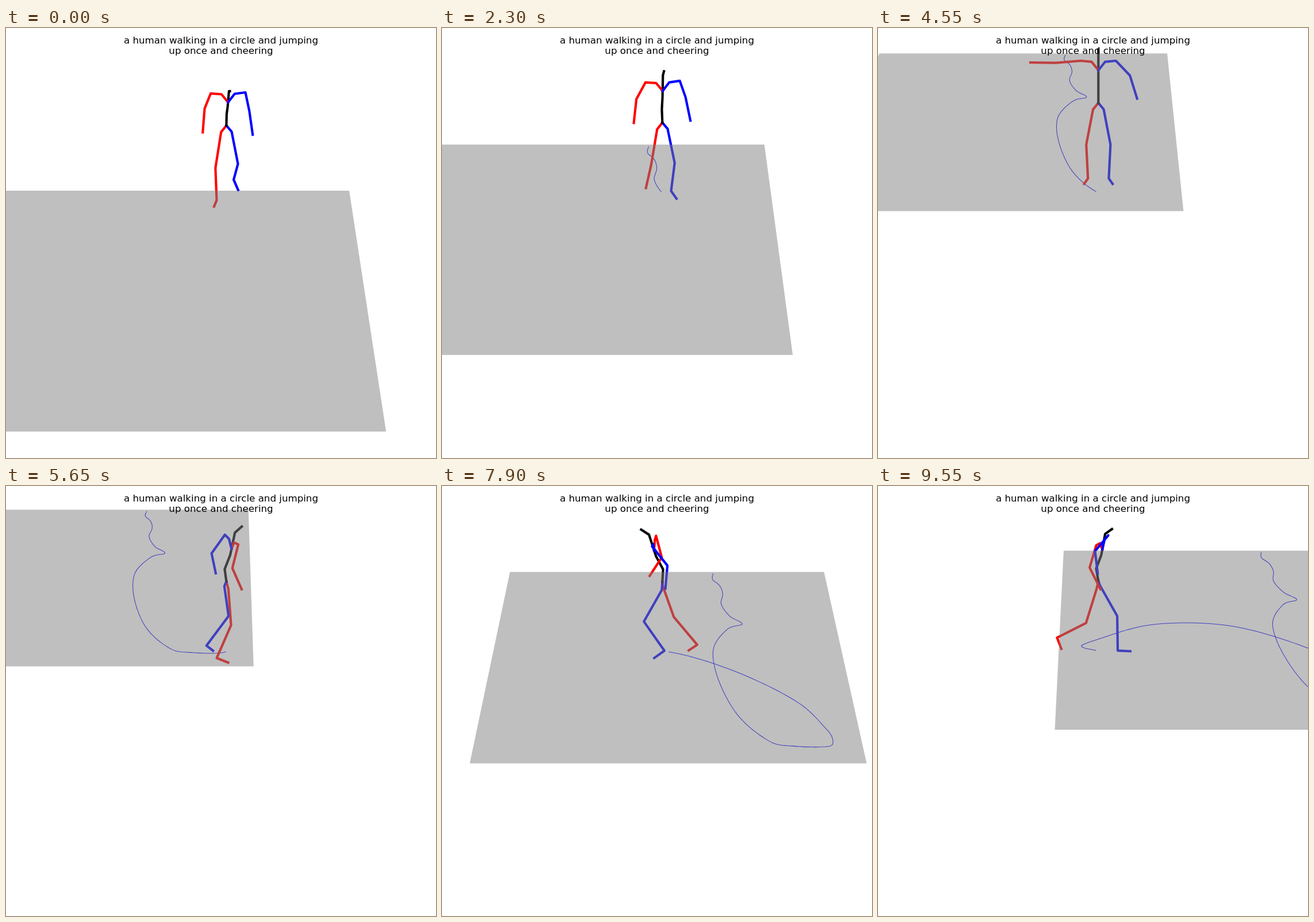
Recreate the animation shown at these times as an HTML page with a canvas. Size 748x748 px, loop 9600 ms.

```html
<!DOCTYPE html>
<html lang="en">
<head>
<meta charset="utf-8">
<title>Walking figure</title>
<style>
html, body { margin: 0; width: 100%; height: 100%; overflow: hidden; background: #fff; }
canvas { display: block; }
</style>
</head>
<body>
<canvas id="stage" width="748" height="748"></canvas>
<script>
const ctx = document.getElementById('stage').getContext('2d');
const LOOP = 9600, STEP = 50;
const RED = '#f00', BLUE = '#00f', BLACK = '#000';

// Camera pitched 30 degrees down, following the figure
const FOCAL = 2583, CENTER_X = 383.35, CENTER_Y = 377.7, RAISE = 90.7;
const COS = Math.cos(Math.PI / 6), SIN = 0.5;
const FLOOR_W = 605.8, FLOOR_D = 690.5, DEPTH_SCALE = 0.75;

// Key points on the floor: time, x, z
const route = [
  [0, 391.5, 8.6], [1000, 390.5, 37], [1300, 402.5, 62], [1550, 407, 97],
  [1850, 402.6, 140], [2300, 417, 191], [2680, 437.7, 222], [3000, 411, 241],
  [3300, 383.4, 314], [3620, 387, 420], [4000, 414, 541], [4550, 461, 625],
  [5000, 497, 640], [5500, 552, 641], [5780, 561, 624], [6000, 556, 594],
  [6700, 510.5, 497], [7400, 403, 387], [7900, 294, 325], [8450, 163.6, 324.5],
  [9000, 54, 391], [9180, 39.4, 408], [9550, 69, 424.7]
];

// Body control: time, heading, gait phase, stride, lean, arm spread
const motion = [
  [0, 0.1, 2.3, 0.25, 0.37, 0.2],
  [1300, 0.15, 6, 0.35, 0.12, 0.3],
  [2200, 0.15, 12, 0.35, -0.1, 0.3],
  [3300, 0.25, 18.65, 0.6, 0.47, 0.5],
  [4550, 0, 25, 0, -0.12, 0.6],
  [5500, 1.7, 28, 0.3, 0.05, 0.3],
  [6700, 3.7, 33.3, 0.45, -0.15, 0.25],
  [7900, 4.6, 41.6, 0.55, 0.12, 0.1],
  [9100, 6.3, 47.3, 0.4, 0.05, 0.1],
  [9550, 7.5, 49.27, 0.4, 0, 0.1]
];

// Spine joints above the pelvis: forward, up
const SPINE = [[-4, 23], [5, 48], [7, 59], [12, 88], [24, 98]];

const { sin, cos, PI, max } = Math;
const clamp = v => max(0, Math.min(1, v));

// Smooth curve through timed rows, one value per column after the time
function sample(keys, t) {
  let i = 0;
  while (i < keys.length - 2 && keys[i + 1][0] <= t) i++;
  const a = keys[i], b = keys[i + 1];
  const before = keys[i - 1] || a, after = keys[i + 2] || b;
  const span = b[0] - a[0], u = clamp((t - a[0]) / span);
  return a.slice(1).map((from, n) => {
    const k = n + 1, d = b[k] - from;
    const va = (b[k] - before[k]) / (b[0] - before[0]) * span;
    const vb = (after[k] - from) / (after[0] - a[0]) * span;
    return from + u * (va + u * (3 * d - 2 * va - vb + u * (va + vb - 2 * d)));
  });
}

function project([x, y, z]) {
  const scale = FOCAL / (FOCAL - SIN * y - COS * z);
  return [CENTER_X + x * scale, CENTER_Y - (RAISE + COS * y - SIN * z) * scale];
}

// Adds bones [length, forward angle, outward angle] one after another
function limb(points, side, bones) {
  for (const [length, angle, splay] of bones) {
    const [x, y, z] = points[points.length - 1];
    points.push([
      x + side * length * sin(splay),
      y - length * cos(splay) * cos(angle),
      z + length * cos(splay) * sin(angle)
    ]);
  }
  return points;
}

// Body chains in the order they are painted; local axes are left, up, forward
function figure(t) {
  const [heading, phase, stride, lean, spread] = sample(motion, t);
  const hop = sin(PI * clamp((t - 4380) / 520));
  const pelvis = [0, 134 - 12 * lean + 42 * hop, 0];
  const spine = [pelvis, ...SPINE.map(([forward, up]) => [
    0,
    pelvis[1] + up * cos(lean) - forward * sin(lean),
    forward * cos(lean) + up * sin(lean)
  ])];
  const chest = spine[3];

  const leg = side => {
    const p = side < 0 ? phase : phase + PI;
    const thigh = 0.1 + stride * sin(p);
    const shin = thigh - 0.4 + 0.3 * hop - 1.6 * stride * max(0, cos(p));
    const hip = [side * 9, pelvis[1] - 12, 0];
    return limb([pelvis, hip], side, [[65, thigh, 0.18], [66, shin, -0.04], [22, shin + 1.5, 0.3]]);
  };
  const arm = side => {
    const p = side < 0 ? phase : phase + PI;
    const swing = -0.45 - 0.6 * stride * sin(p);
    const cheer = side < 0 ? hop : 0;
    const [, y, z] = chest;
    return limb([chest, [side * 11, y + 15, z], [side * 29, y + 17, z]], side,
      [[42, swing, spread + cheer], [42, swing + 0.75, spread * 0.5 + 1.5 * cheer]]);
  };

  const place = ([left, up, forward]) => project([
    left * cos(heading) + forward * sin(heading),
    up,
    DEPTH_SCALE * (forward * cos(heading) - left * sin(heading))
  ]);
  return [[RED, leg(-1)], [BLUE, leg(1)], [BLACK, spine], [RED, arm(-1)], [BLUE, arm(1)]]
    .map(([color, points]) => [color, points.map(place)]);
}

function trace(points) {
  ctx.beginPath();
  points.forEach(p => ctx.lineTo(...p));
}

function line(points, color, width) {
  trace(points);
  ctx.strokeStyle = color;
  ctx.lineWidth = width;
  ctx.stroke();
}

function draw(t) {
  const [rootX, rootZ] = sample(route, t);
  const onFloor = ([x, z]) => project([x - rootX, 0, z - rootZ]);
  ctx.fillStyle = '#fff';
  ctx.fillRect(0, 0, 748, 748);
  ctx.lineCap = 'square';
  ctx.lineJoin = 'round';

  const trail = [];
  for (let s = 0; s < t; s += STEP) trail.push(onFloor(sample(route, s)));
  if (trail.length > 1) line(trail, BLUE, 1.04);

  for (const [color, points] of figure(t)) line(points, color, 4.17);

  // The translucent floor tints everything it covers
  trace([[0, 0], [FLOOR_W, 0], [FLOOR_W, FLOOR_D], [0, FLOOR_D]].map(onFloor));
  ctx.fillStyle = 'rgba(128,128,128,.5)';
  ctx.fill();

  ctx.fillStyle = BLACK;
  ctx.font = '16.67px "DejaVu Sans", sans-serif';
  ctx.textAlign = 'center';
  ctx.fillText('a human walking in a circle and jumping', 374, 27);
  ctx.fillText('up once and cheering', 374, 45);
}

const start = performance.now();
function tick() {
  const t = (performance.now() - start) % LOOP;
  draw(Math.floor(t / STEP) * STEP);
  requestAnimationFrame(tick);
}
tick();
</script>
</body>
</html>
```
